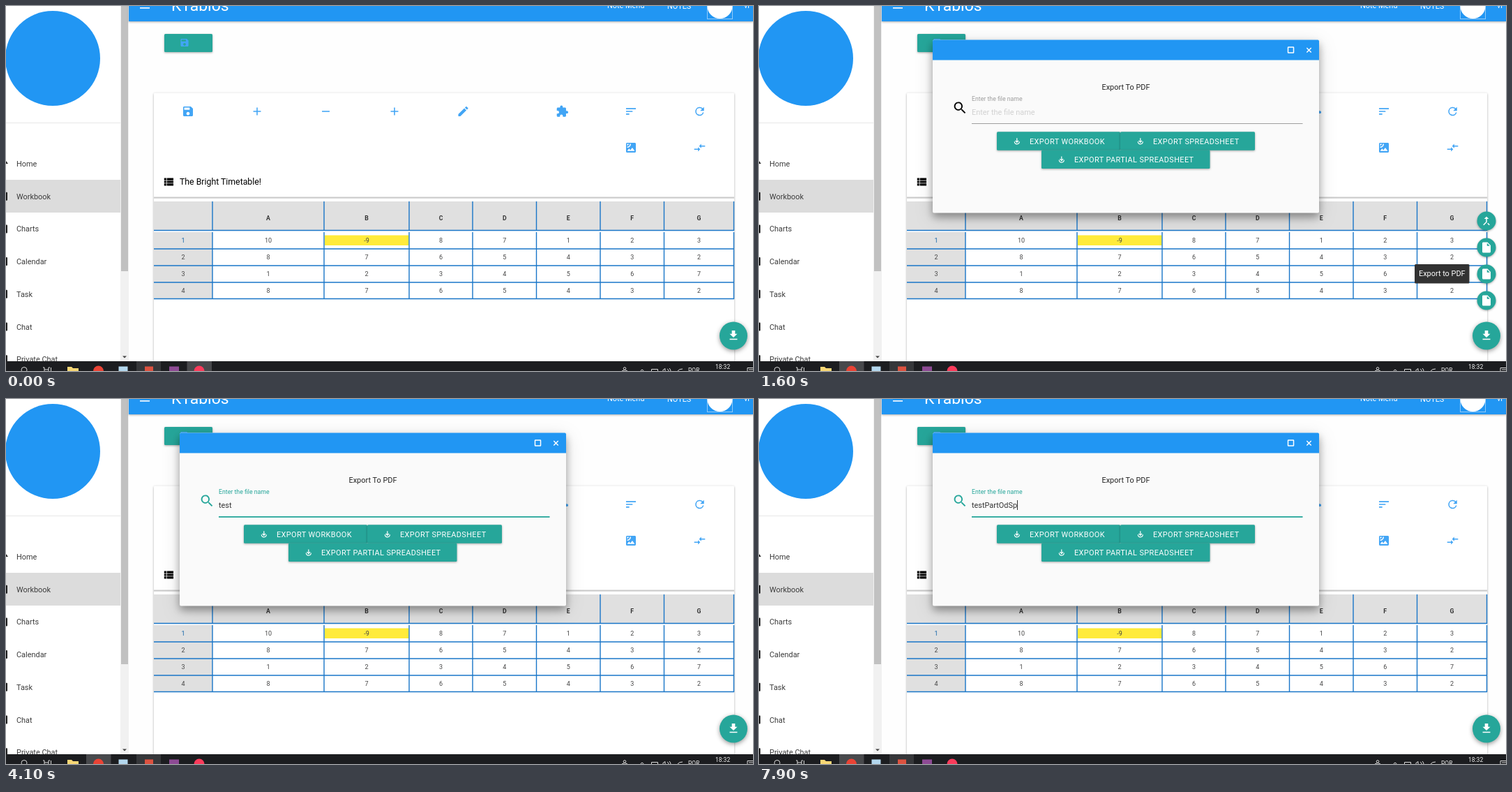
An HTML page that plays this animation: 1071x523 px, repeating every 8000 ms.

```html
<!DOCTYPE html>
<html lang="en">
<head>
<meta charset="utf-8">
<title>Spreadsheet export</title>
<style>
html, body { margin: 0; width: 100%; height: 100%; overflow: hidden; background: #fefefe; }
svg { display: block; width: 100vw; height: 100vh; font-family: Roboto, sans-serif; }
text { white-space: pre; }
.low { filter: drop-shadow(0 1px 1.5px #0005); }
.mid { filter: drop-shadow(0 2px 3px #0006); }
.high { filter: drop-shadow(0 6px 6px #0005) drop-shadow(0 5px 12px #0002); }
.caps { letter-spacing: .39px; }
</style>
</head>
<body>
<svg id="stage" viewBox="0 0 1071 523"></svg>
<script>
const BLUE = '#2196f3', ICON = '#42a5f5', TEAL = '#26a69a', LINE = '#1976c8', GREY = '#e0e0e0';
const SIZE = 10.92;

const paths = {
  save: 'M17 3H5c-1.11 0-2 .9-2 2v14c0 1.1.89 2 2 2h14c1.1 0 2-.9 2-2V7l-4-4zm-5 16c-1.66 0-3-1.34-3-3s1.34-3 3-3 3 1.34 3 3-1.34 3-3 3zm3-10H5V5h10v4z',
  add: 'M19 13h-6v6h-2v-6H5v-2h6V5h2v6h6v2z',
  remove: 'M19 13H5v-2h14v2z',
  edit: 'M3 17.25V21h3.75L17.81 9.94l-3.75-3.75L3 17.25zM20.71 7.04a1 1 0 0 0 0-1.41l-2.34-2.34a1 1 0 0 0-1.41 0l-1.83 1.83 3.75 3.75 1.83-1.83z',
  extension: 'M20.5 11H19V7c0-1.1-.9-2-2-2h-4V3.5a2.5 2.5 0 0 0-5 0V5H4c-1.1 0-2 .9-2 2v3.8h1.5a2.7 2.7 0 0 1 0 5.4H2V20c0 1.1.9 2 2 2h3.8v-1.5a2.7 2.7 0 0 1 5.4 0V22H17c1.1 0 2-.9 2-2v-4h1.5a2.5 2.5 0 0 0 0-5z',
  sort: 'M3 18h6v-2H3v2zM3 6v2h18V6H3zm0 7h12v-2H3v2z',
  refresh: 'M17.65 6.35A8 8 0 1 0 19.73 14h-2.08A6 6 0 1 1 12 6c1.66 0 3.14.69 4.22 1.78L13 11h7V4l-2.35 2.35z',
  picture: 'M19 3H5c-1.1 0-2 .9-2 2v14c0 1.1.9 2 2 2h14c1.1 0 2-.9 2-2V5c0-1.1-.9-2-2-2zM5 5h3a3 3 0 0 1-3 3V5zm0 7v-2a5 5 0 0 0 5-5h2a7 7 0 0 1-7 7zm0 6l3.5-4.5 2.5 3L14.5 12l4.5 6H5z',
  compare: 'M9 14H2v2h7v3l4-4-4-4v3zm6-1v-3h7V8h-7V5l-4 4 4 4z',
  list: 'M4 14h4v-4H4v4zm0 5h4v-4H4v4zM4 9h4V5H4v4zm5 5h12v-4H9v4zm0 5h12v-4H9v4zM9 5v4h12V5H9z',
  download: 'M19 9h-4V3H9v6H5l7 7 7-7zM5 18v2h14v-2H5z',
  merge: 'M17 20.41L18.41 19 15 15.59 13.59 17 17 20.41zM7.5 8H11v5.59L5.59 19 7 20.41l6-6V8h3.5L12 3.5 7.5 8z',
  file: 'M6 2c-1.1 0-2 .9-2 2v16c0 1.1.9 2 2 2h12c1.1 0 2-.9 2-2V8l-6-6H6zm7 7V3.5L18.5 9H13z',
  search: 'M15.5 14h-.79l-.28-.27A6.5 6.5 0 1 0 13.73 14.43l.27.28v.79l5 5L20.5 19l-5-5zm-6 0a4.5 4.5 0 1 1 0-9 4.5 4.5 0 0 1 0 9z'
};

const rect = (x, y, w, h, fill, more = '') =>
  `<rect x="${x}" y="${y}" width="${w}" height="${h}" fill="${fill}" ${more}/>`;
const circle = (x, y, r, fill, more = '') => `<circle cx="${x}" cy="${y}" r="${r}" fill="${fill}" ${more}/>`;
const text = (x, y, str, fill, size = SIZE, more = '') =>
  `<text x="${x}" y="${y}" fill="${fill}" font-size="${size}" ${more}>${str}</text>`;
const stroke = (d, color, width = 1, more = '') =>
  `<path d="${d}" fill="none" stroke="${color}" stroke-width="${width}" ${more}/>`;
const icon = (name, x, y, fill, scale = .78, more = '') =>
  `<path d="${paths[name]}" fill="${fill}" transform="translate(${x} ${y}) scale(${scale}) translate(-12 -12)" ${more}/>`;
const middle = 'text-anchor="middle"';

function sidebar() {
  const items = ['Home', 'Workbook', 'Charts', 'Calendar', 'Task', 'Chat', 'Private Chat'];
  return rect(0, 0, 164, 509, '#fff') + circle(67, 75, 68, BLUE) +
    rect(0, 167, 164, 1, '#e8e8e8') + rect(0, 249, 164, 47, '#dcdcdc') +
    items.map((name, i) => {
      const y = 226 + i * 46.7;
      const edge = i ? rect(-3, y - 6, 5, 12, '#222', 'rx="1"') : '<path d="M0 222l3 4H0z" fill="#222"/>';
      return edge + text(15, y + 4, name, '#3c3c3c');
    }).join('') +
    rect(164, 0, 12, 509, '#f1f1f1') + rect(165, 0, 10, 380, '#c1c1c1') +
    '<path d="M167 501.500h6l-3 3z" fill="#444"/>';
}

function header() {
  return rect(176, -10, 895, 32, BLUE, 'class="low"') + rect(192, 2, 14, 1.6, '#fff') +
    text(237, 7, 'KTablos', '#fff', 22.9) + text(862, 3, 'Note Menu', '#fff') +
    text(948, 3.5, 'NOTES', '#fff') + text(1058, 3, 'vi', '#fff') +
    rect(1005.5, -18, 36, 36.5, 'none', 'stroke="#90caf9"') + circle(1023.5, 0, 18, '#fff');
}

function card() {
  const tools = [['save', 261], ['add', 360], ['remove', 458.5], ['add', 557], ['edit', 655.5],
    ['extension', 797.5], ['sort', 896], ['refresh', 994.5]];
  return rect(227, 40, 69, 26, TEAL, 'rx="1.5" class="low"') + icon('save', 256, 52.5, ICON, .62) +
    rect(212, 124.500, 832, 410, '#fff', 'rx="1.5" class="low"') +
    tools.map(([name, x]) => icon(name, x, 151, ICON)).join('') +
    icon('picture', 896, 203, ICON) + icon('compare', 994.5, 203, ICON) +
    icon('list', 233, 252, '#000') + text(249, 256, 'The Bright Timetable!', '#000', 12.3) +
    rect(212, 273.500, 832, 2.2, '#ccc');
}

function table() {
  const cols = [212, 296, 456, 578, 669, 760.5, 852, 943.5, 1043.5];
  const rows = ['1 10 -9 8 7 1 2 3', '2 8 7 6 5 4 3 2', '3 1 2 3 4 5 6 7', '4 8 7 6 5 4 3 2'];
  const mid = c => (cols[c] + cols[c + 1]) / 2;
  let out = rect(212, 280, 832, 42, GREY) + rect(212, 324, 84, 96, GREY) + rect(457, 328.500, 120.5, 14.5, '#ffeb3b');
  for (const x of cols.slice(1)) out += stroke(`M${x} 280V322M${x} 324V420`, LINE, 1.4);
  for (const y of [321.5, 348, 372, 396, 419.5]) out += stroke(`M212 ${y}H1044`, LINE, 1.4);
  [...'ABCDEFG'].forEach((name, i) => {
    out += text(mid(i + 1), 306.5, name, '#333', 8.7, middle + ' font-weight="700"');
  });
  rows.forEach((row, r) => row.split(' ').forEach((value, c) => {
    out += text(mid(c), 338.500 + r * 24, value, r + c ? '#444' : '#1565a8', 9, middle);
  }));
  return out;
}

function floating() {
  return ['merge', 'file', 'file', 'file'].map((name, i) =>
    `<g class="option">${circle(0, 0, 13.5, TEAL, 'class="low"') + icon(name, 0, 0, '#fff', .75)}</g>`).join('') +
    circle(1043, 472.5, 20, TEAL, 'class="mid"') + icon('download', 1043, 472, '#fff') +
    `<g id="tip">${rect(940, 370, 78.5, 27.5, '#323232', 'rx="1.5"') + text(979.3, 387.3, 'Export to PDF', '#fff', SIZE, middle)}</g>`;
}

function exportButton(x, y, w, label) {
  return rect(x, y, w, 26.5, TEAL, 'rx="1.5" class="low"') +
    stroke('M0-4.500V1.500M-2.300-1L0 1.500 2.300-1M-3.500 0.500C-3.500 5.200 3.500 5.200 3.500 0.500', '#fff', 1.2,
      `transform="translate(${x + 28.8} ${y + 13.5})"`) +
    text(x + 47, y + 17.3, label, '#fff', SIZE, 'class="caps"');
}

function dialog() {
  return `<g id="dialog">` + rect(249, 48.500, 554, 248, '#fafafa', 'rx="2" class="high"') +
    `<path d="M249 77.500V50.500q0-2 2-2H801q2 0 2 2V77.500z" fill="${BLUE}"/>` +
    rect(758.5, 59, 8, 8, 'none', 'rx=".5" stroke="#fff" stroke-width="1.500"') +
    stroke('M785.300 60l6.400 6.400m0-6.400l-6.400 6.400', '#fff', 1.4) +
    text(526, 120.3, 'Export To PDF', '#222', SIZE, middle) +
    icon('search', 288.2, 146, '#000', .95, 'id="glass"') +
    text(305, 135.5, 'Enter the file name', '#9e9e9e', 8.76, 'id="label"') +
    text(305, 156, 'Enter the file name', '#d1d1d1', SIZE, 'id="hint"') +
    text(305, 156, '', '#333', SIZE, 'id="value"') + rect(305, 145, 1, 14, '#333', 'id="caret"') +
    rect(305, 168, 474.5, 1, '#9e9e9e', 'id="rule"') +
    exportButton(341, 180.3, 177, 'EXPORT WORKBOOK') + exportButton(518, 180.3, 193, 'EXPORT SPREADSHEET') +
    exportButton(405, 206.6, 241.5, 'EXPORT PARTIAL SPREADSHEET') + '</g>';
}

function taskbar() {
  const pale = '#ddd';
  return rect(0, 509, 1071, 14, '#1c1d20') + rect(187, 509, 35, 14, '#36373a') +
    rect(259.5, 509, 35.5, 14, '#48494c', 'id="active"') +
    circle(26, 521.5, 4, 'none', `stroke="${pale}"`) +
    stroke('M53 518h2m6 0h2M55 518v5m6-5v5M55 521h6M64.500 518v5', pale) +
    '<path d="M88 523v-6h6l2 2h8v4z" fill="#f8d775"/>' +
    circle(132.5, 523, 7.5, '#ea4335') + rect(161.5, 516.5, 13, 13, '#b3d7ee') +
    rect(199, 516.5, 12, 12, '#dd5240') + rect(234, 516.5, 14, 10, '#8d4a94') + circle(277, 523, 7.5, '#fb3b5b') +
    circle(887, 519.5, 1.8, 'none', `stroke="${pale}"`) +
    stroke('M883 523q4-3 8 0M909.500 523l2.500-2 2.500 2M925.500 523v-2.500h9v2.500M942 523v-1.500l3-2v3.500M948 520q2 1 2 3M951 519q2 2 2 4M963 523q2-3 7-3', pale) +
    text(978, 524.5, 'POR', '#eee', 8.5) + text(1017, 520, '18:32', '#eee', 8.5) +
    stroke('M1063 523v-4.500h8M1065 521h6', pale);
}

const $ = id => document.getElementById(id);
$('stage').innerHTML = rect(0, 0, 1071, 523, '#fefefe') + card() + table() + sidebar() + header() +
  floating() + dialog() + taskbar();

const options = [...document.querySelectorAll('.option')];
const clamp = v => Math.max(0, Math.min(1, v));
const ramp = (t, from, span) => clamp((t - from) / span);
const mix = (a, b, k) => `rgb(${a.map((v, i) => Math.round(v + (b[i] - v) * k))})`;
const show = (id, on) => $(id).setAttribute('visibility', on ? 'visible' : 'hidden');

const typed = 'testPartOdSp';
const keys = [3200, 3300, 3500, 3600, 5200, 6000, 6100, 6300, 6700, 6900, 7500, 7900];
const teal = [38, 166, 154];

function draw(t) {
  options.forEach((el, i) => {
    const k = ramp(t, 330 + (3 - i) * 90, 240) * (1 - ramp(t, 1780, 260));
    el.setAttribute('opacity', k);
    el.setAttribute('transform', `translate(1043 ${308 + i * 38 + 31 * (1 - k)}) scale(${.4 + .6 * k})`);
  });

  const tip = ramp(t, 1350, 250);
  $('tip').setAttribute('opacity', tip * (1 - ramp(t, 1750, 250)));
  $('tip').setAttribute('transform', `translate(${7 * (1 - tip)})`);

  const open = t >= 1600;
  $('dialog').setAttribute('display', open ? 'inline' : 'none');
  $('active').setAttribute('x', open ? 115 : 259.5);
  if (!open) return;

  const focus = ramp(t, 2200, 400);
  $('glass').setAttribute('fill', mix([0, 0, 0], teal, focus));
  for (const id of ['label', 'rule']) $(id).setAttribute('fill', mix([158, 158, 158], teal, focus));
  $('rule').setAttribute('height', 1 + .8 * focus);

  const count = keys.filter(k => k <= t).length;
  $('value').textContent = typed.slice(0, count);
  show('hint', !count);
  const since = t - (count ? keys[count - 1] : 2400);
  show('caret', since >= 0 && since % 1000 < 500);
  $('caret').setAttribute('x', Math.floor(305 + (count ? $('value').getComputedTextLength() : 0)));
}

function tick() {
  draw(Math.floor(performance.now() % 8000 / 100) * 100);
  requestAnimationFrame(tick);
}
tick();
</script>
</body>
</html>
```
